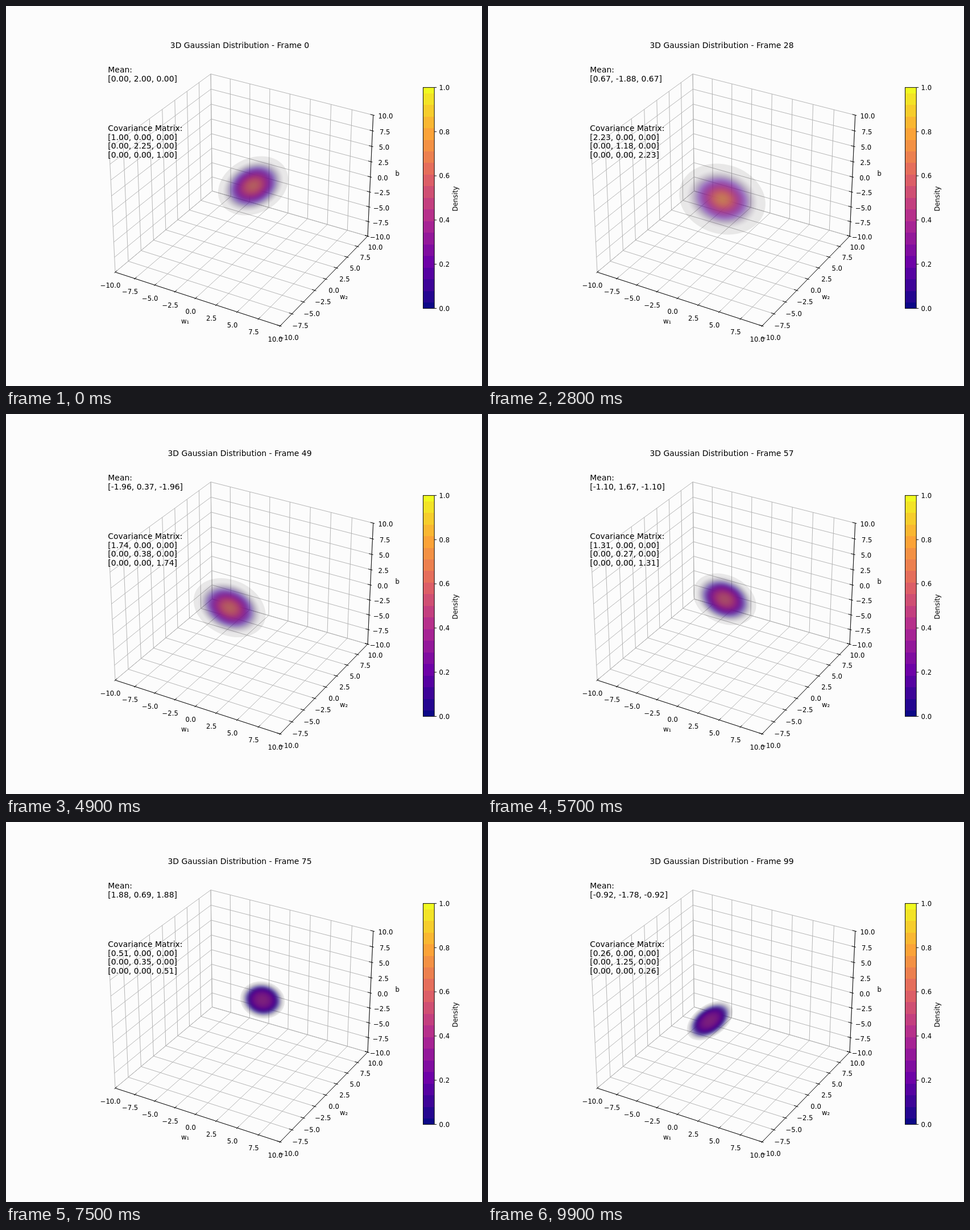
Write an HTML page that moves like this. It is 837 px wide and 669 px high and loops after 10 s.

```html
<!DOCTYPE html>
<html lang="en">
<head>
<meta charset="utf-8">
<title>3D Gaussian Distribution</title>
<style>
  html, body { margin: 0; height: 100%; overflow: hidden; background: #fcfcfc; }
  svg { display: block; font: 11.62px "DejaVu Sans", sans-serif; }
  .big { font-size: 13.95px; white-space: pre; }
  .grid { stroke: #b0b0b0; stroke-width: .93; fill: none; stroke-linejoin: round; }
  .axis { stroke: #000; stroke-width: .95; fill: none; }
</style>
</head>
<body>
<svg id="stage" width="837" height="669" viewBox="0 0 837 669">
  <defs><radialGradient id="glow"></radialGradient></defs>
</svg>
<script>
const stage = document.getElementById('stage');
const glow = document.getElementById('glow');

function add(tag, attrs, parent = stage) {
  const el = document.createElementNS('http://www.w3.org/2000/svg', tag);
  for (const name in attrs) el.setAttribute(name, attrs[name]);
  return parent.appendChild(el);
}

function label(x, y, str, attrs = { 'text-anchor': 'middle' }) {
  const el = add('text', { x, y, ...attrs });
  el.textContent = str;
  return el;
}

function line(cls, ...points) {
  add('polyline', { class: cls, points: points.map(p => p.slice(0, 2).join()).join(' ') });
}

// Plasma colour map from evenly spaced key colours
const keys = [0x0d0887, 0x6a00a8, 0xb12a90, 0xe16462, 0xfca636, 0xf0f921]
  .map(c => [c >> 16, c >> 8 & 255, c & 255]);
function plasma(v) {
  const i = Math.min(keys.length - 2, Math.floor(v * (keys.length - 1)));
  const t = v * (keys.length - 1) - i;
  return keys[i].map((c, j) => c + (keys[i + 1][j] - c) * t);
}
const rgb = color => `rgb(${color.map(Math.round)})`;

// Perspective view at elevation 30, azimuth -60; also returns pixels per data unit
const UNIT = 0.05952;
function project(x, y, z) {
  z *= 0.75;
  const k = 2790 * UNIT / (10 - UNIT * (0.433 * x - 0.75 * y + 0.5 * z));
  return [418.1 + k * (0.866 * x + 0.5 * y),
          330.8 - k * (-0.25 * x + 0.433 * y + 0.866 * z), k];
}

const L = -10, H = 10, OUT = 0.167, IN = 0.333;

function tickLabel([x, y], dx, dy, v) {
  label(x + dx, y + dy + 4.2, v.toFixed(1).replace('-', '\u2212'));
}

for (let v = L; v <= H; v += 2.5) {
  line('grid', project(v, L, L), project(v, H, L), project(v, H, H));
  line('grid', project(H, v, L), project(L, v, L), project(L, v, H));
  line('grid', project(L, L, v), project(L, H, v), project(H, H, v));
}
line('axis', project(L, L, L), project(H, L, L), project(H, H, L), project(H, H, H));
for (let v = L; v <= H; v += 2.5) {
  line('axis', project(v, L - OUT, L), project(v, L + IN, L));
  line('axis', project(H + OUT, v, L), project(H - IN, v, L));
  line('axis', project(H + OUT, H, v), project(H - IN, H, v));
  tickLabel(project(v, L, L), -8.5, 23.4, v);
  tickLabel(project(H, v, L), 14.2 - v * 0.08, 20 - v * 0.08, v);
  tickLabel(project(H, H, v), 21.7, 1.8, v);
}
label(315, 558.5, 'w₁');
label(594, 516, 'w₂');
label(688.3, 298.5, 'b');

// Colour bar
const BAR = { x: 733.5, y: 143.4, width: 19.7, height: 389 };
const barY = v => BAR.y + BAR.height * (1 - v);
for (let i = 0; i < 20; i++) {
  const top = barY(Math.min(1, (i + 0.5) / 19));
  const bottom = barY(Math.max(0, (i - 0.5) / 19));
  add('rect', { x: BAR.x, y: top, width: BAR.width, height: bottom - top,
                fill: rgb(plasma(i / 19)), 'shape-rendering': 'crispEdges' });
}
add('rect', { class: 'axis', ...BAR });
for (let v = 0; v <= 5; v++) {
  const y = barY(v / 5), x = BAR.x + BAR.width;
  line('axis', [x, y], [x + 4, y]);
  label(x + 8.4, y + 4.3, (v / 5).toFixed(1), {});
}
label(0, 0, 'Density', { 'text-anchor': 'middle', transform: 'translate(794 339.5) rotate(-90)' });

const STOPS = 32, RIM = 3.3, HALO = 0.085;
const stops = Array.from({ length: STOPS + 1 }, (_, i) => add('stop', { offset: i / STOPS }, glow));
const cloud = add('ellipse', { fill: 'url(#glow)' });

const title = label(411, 73.8, '', { class: 'big', 'text-anchor': 'middle' });
const textRow = (y, str = '') => label(179.3, y, str, { class: 'big' });
textRow(116.8, 'Mean:');
const meanRow = textRow(132.7);
textRow(219.9, 'Covariance Matrix:');
const covRows = [0, 1, 2].map(i => textRow(235.6 + 15.6 * i));
const vector = v => `[${v.map(n => n.toFixed(2)).join(', ')}]`;

// Look through the cloud, front to back, at r deviations from its centre
function castRay(r, thickness) {
  const dz = 0.1, color = [0, 0, 0];
  let clear = 1;
  for (let z = -3.5; z < 3.5; z += dz) {
    const density = Math.exp(-(r * r + z * z) / 2);
    const seen = clear * (1 - Math.exp(-thickness * density * dz / Math.sqrt(2 * Math.PI)));
    plasma(density).forEach((c, j) => color[j] += c * seen);
    clear -= seen;
  }
  const alpha = 1 - clear;
  const [red, green, blue] = color.map(c => c / alpha);
  // Thin haze loses its blue and turns grey
  return [[red, green, blue * 0.88 * Math.min(1, 2 * alpha)], Math.max(alpha, HALO)];
}

function drawCloud(mean, sx, sy) {
  const [cx, cy, k] = project(...mean);
  // Covariance of the projected cloud and its principal axes
  const a = k * k * (0.75 * sx * sx + 0.25 * sy * sy);
  const b = k * k * 0.2165 * (sx * sx - sy * sy);
  const d = k * k * (0.4844 * sx * sx + 0.1875 * sy * sy);
  const mid = (a + d) / 2, spread = Math.hypot((a - d) / 2, b);
  const angle = Math.atan2(2 * b, a - d) * 90 / Math.PI;
  const radius = variance => 3.03 * Math.sqrt(variance) + 4.5;
  const shape = { rx: radius(mid + spread), ry: radius(mid - spread),
                  transform: `translate(${cx} ${cy}) rotate(${angle})` };
  for (const name in shape) cloud.setAttribute(name, shape[name]);

  const thickness = 1650 / Math.sqrt(a * d - b * b);
  stops.forEach((stop, i) => {
    const [color, alpha] = castRay(RIM * i / STOPS, thickness);
    stop.setAttribute('stop-color', rgb(color));
    stop.setAttribute('stop-opacity', alpha);
  });
}

let shown = -1;
function render(now) {
  const n = Math.floor(now / 100) % 100;
  if (n === shown) return;
  shown = n;
  const s = 2 * Math.sin(n / 10), c = 2 * Math.cos(n / 10);
  const sx = 1 + 0.5 * Math.sin(n / 20), sy = 1 + 0.5 * Math.cos(n / 20);
  title.textContent = `3D Gaussian Distribution - Frame ${n}`;
  meanRow.textContent = vector([s, c, s]);
  [sx, sy, sx].forEach((dev, i) => {
    covRows[i].textContent = vector([0, 1, 2].map(j => i === j ? dev * dev : 0));
  });
  drawCloud([s, c, s], sx, sy);
}

const start = performance.now();
function tick() {
  render(performance.now() - start);
  requestAnimationFrame(tick);
}
tick();
</script>
</body>
</html>
```
